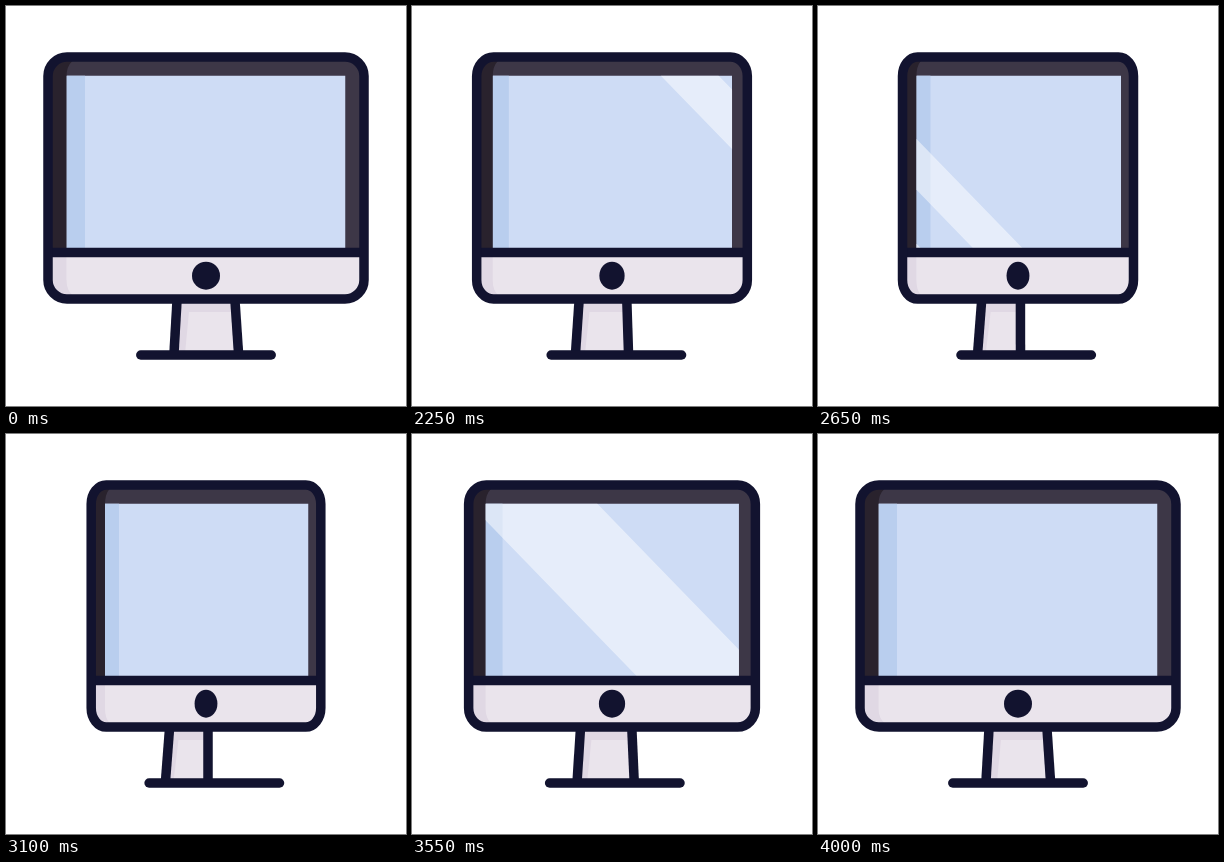
An HTML page with a canvas for the animation above (4020 ms loop, 400 by 400 pixels).

```html
<!DOCTYPE html>
<html>
<head>
<meta charset="utf-8">
<style>
html, body { margin: 0; width: 100%; height: 100%; overflow: hidden; background: #fff; }
canvas { display: block; width: 400px; height: 400px; }
</style>
</head>
<body>
<canvas id="stage"></canvas>
<script>
const LOOP = 4020;
const INK = '#12132f', BEZEL = '#3d3747', BEZEL_DARK = '#29222d';
const SHELL = '#eae4ec', SHELL_DARK = '#e0d8e4';
const SCREEN = '#cedcf5', SCREEN_DARK = '#b9ceee';
const TOP = 69.5, BOTTOM = 246.5, LEAN = 0.97;

const canvas = document.getElementById('stage');
const ctx = canvas.getContext('2d');
const dpr = window.devicePixelRatio || 1;
canvas.width = canvas.height = 400 * dpr;
ctx.scale(dpr, dpr);

const clamp = v => Math.min(1, Math.max(0, v));
const smooth = u => u * u * (3 - 2 * u);
const cubic = (a, b, s) => 3 * (1 - s) * (1 - s) * s * a + 3 * (1 - s) * s * s * b + s * s * s;

// cubic-bezier(.25, .1, .25, 1)
function ease(u) {
  if (u <= 0 || u >= 1) return clamp(u);
  let lo = 0, hi = 1;
  for (let i = 0; i < 24; i++) {
    const mid = (lo + hi) / 2;
    if (cubic(0.25, 0.25, mid) < u) lo = mid; else hi = mid;
  }
  return cubic(0.1, 1, lo);
}

function poly(points, fill) {
  ctx.beginPath();
  points.forEach(([x, y]) => ctx.lineTo(x, y));
  ctx.closePath();
  ctx.fillStyle = fill;
  ctx.fill();
}

function rect(x0, y0, x1, y1, fill) {
  ctx.fillStyle = fill;
  ctx.fillRect(x0, y0, x1 - x0, y1 - y0);
}

function line(x0, y0, x1, y1, cap) {
  ctx.beginPath();
  ctx.moveTo(x0, y0);
  ctx.lineTo(x1, y1);
  ctx.lineCap = cap;
  ctx.stroke();
}

// rounded box with elliptical corners
function casePath(x0, y0, x1, y1, rx, ry) {
  const P = Math.PI, corner = (x, y, a) => ctx.ellipse(x, y, rx, ry, 0, a, a + P / 2);
  ctx.beginPath();
  corner(x0 + rx, y0 + ry, P);
  corner(x1 - rx, y0 + ry, -P / 2);
  corner(x1 - rx, y1 - ry, 0);
  corner(x0 + rx, y1 - ry, P / 2);
  ctx.closePath();
}

function stand(q) {
  const lt = 171 - 7.5 * q, lb = 168 - 8.5 * q;
  const rt = 229 - 27 * q, rb = 232.5 - 30.5 * q;
  const inset = 12 - 3 * q;
  poly([[lt, 294], [rt, 294], [rb, 348], [lb, 348]], SHELL_DARK);
  poly([[lt + inset, 306], [rt, 306], [rb, 348], [lb + inset - 1, 348]], SHELL);
  line(lt, 295, lb, 347, 'butt');
  line(rt, 295, rb, 347, 'butt');
  const shift = 8.3 * q;
  line(134.8 + shift, 349, 265.2 + shift, 349, 'round');
}

function glare(l, r) {
  const drop = (BOTTOM - TOP) * LEAN;
  poly([[l, TOP], [r, TOP], [r + drop, BOTTOM], [l + drop, BOTTOM]], 'rgba(255,255,255,.5)');
}

function glares(t) {
  if (t < 3010) {
    const p = smooth(clamp((t - 2020) / 980));
    glare(347 - 700 * p, 398 - 652 * p);
    glare(515 - 743 * p, 536 - 703 * p);
  } else {
    const p = smooth(clamp((t - 3020) / 980));
    glare(660 * p - 314, 624 * p - 166);
  }
}

function monitor(q, t) {
  const x0 = 42 + 43.2 * q, x1 = 400 - x0;
  const left = 60.5 + 38.5 * q, right = 339.5 - 37 * q;
  const curve = 6 - 1.5 * q;

  ctx.save();
  casePath(x0, 51, x1, 293, 19 - 4 * q, 19);
  ctx.clip();
  rect(x0, 50, x1, BOTTOM, BEZEL);
  rect(x0, BOTTOM, x1, 295, SHELL);

  ctx.beginPath();
  ctx.moveTo(x0, 50);
  ctx.lineTo(left + curve, 50);
  ctx.lineTo(left + curve, 55);
  ctx.quadraticCurveTo(left, 60, left, 71);
  ctx.lineTo(left, BOTTOM);
  ctx.lineTo(x0, BOTTOM);
  ctx.fillStyle = BEZEL_DARK;
  ctx.fill();

  ctx.beginPath();
  ctx.moveTo(x0, BOTTOM);
  ctx.lineTo(left, BOTTOM);
  ctx.lineTo(left, 274);
  ctx.quadraticCurveTo(left, 284, left + curve, 289);
  ctx.lineTo(x0, 295);
  ctx.fillStyle = SHELL_DARK;
  ctx.fill();

  ctx.save();
  ctx.beginPath();
  ctx.rect(left, TOP, right - left, BOTTOM - TOP);
  ctx.clip();
  rect(left, TOP, right, BOTTOM, SCREEN);
  rect(left, TOP, left + 18.5 - 4.5 * q, BOTTOM, SCREEN_DARK);
  glares(t);
  ctx.restore();
  ctx.restore();

  line(x0 + 3, BOTTOM, x1 - 3, BOTTOM, 'round');
  casePath(x0, 51, x1, 293, 19 - 4 * q, 19);
  ctx.stroke();

  ctx.beginPath();
  ctx.ellipse(200, 269.7, 14 - 2.6 * q, 14, 0, 0, Math.PI * 2);
  ctx.fillStyle = INK;
  ctx.fill();
}

function draw(t) {
  const q = ease((t - 2020) / 755) - ease((t - 3260) / 755);
  rect(0, 0, 400, 400, '#fff');
  ctx.strokeStyle = INK;
  ctx.lineWidth = 9.5;
  stand(q);
  monitor(q, t);
}

const start = performance.now();
function tick() {
  draw((performance.now() - start) % LOOP);
  requestAnimationFrame(tick);
}
tick();
</script>
</body>
</html>
```
